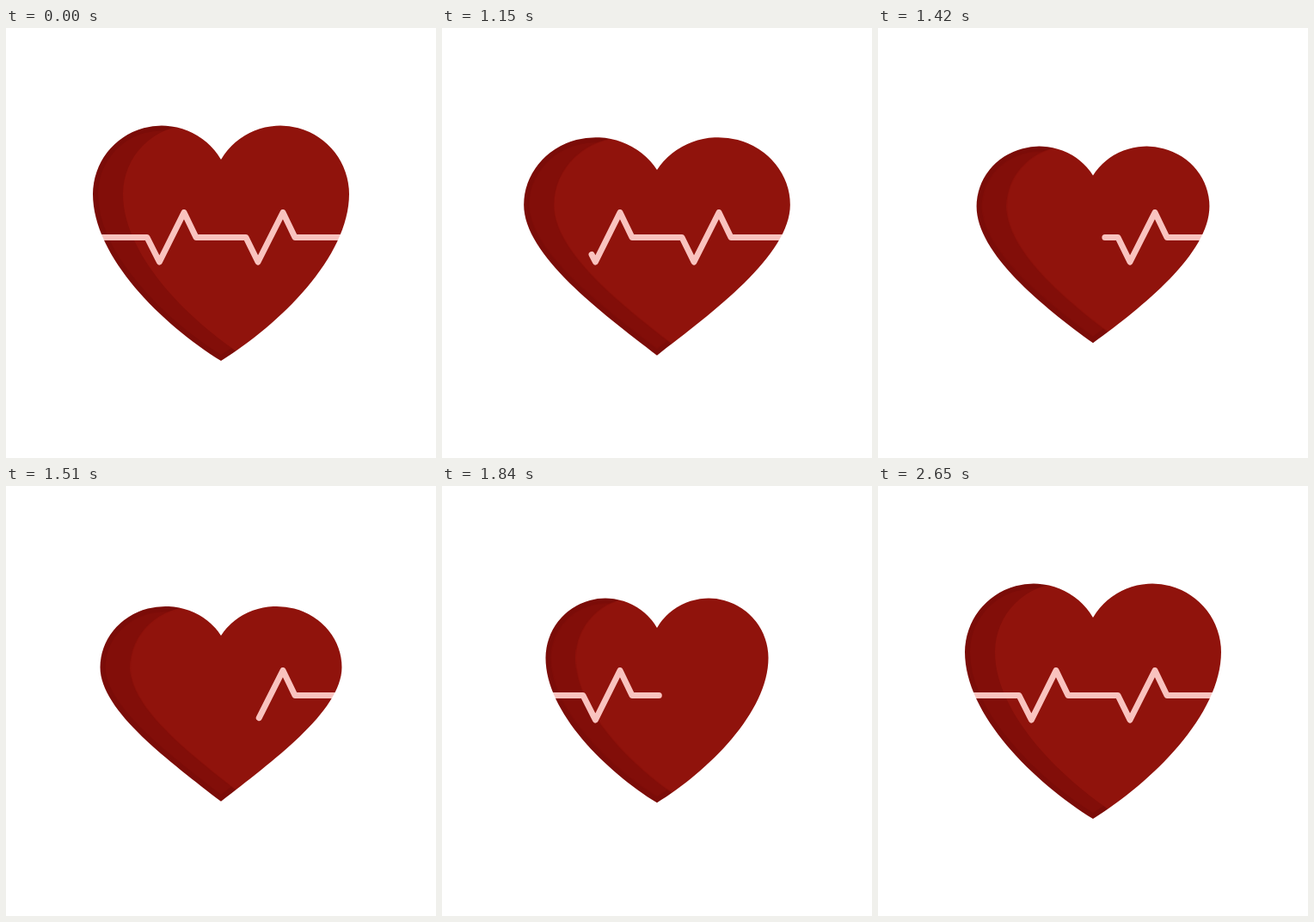
An HTML page without scripts for the animation above (2710 ms loop, 500 px wide and 500 px high).

```html
<!DOCTYPE html>
<html lang="en">
<head>
<meta charset="utf-8">
<title>Heartbeat</title>
<style>
  html, body { margin: 0; width: 100%; height: 100%; overflow: hidden; background: #fff; }
  svg { display: block; width: 100%; height: 100%; }

  .heart { animation: beat 2710ms linear infinite, heart 2710ms linear infinite; }
  .face { fill: #90130c; animation: beat 2710ms linear infinite, face 2710ms linear infinite; }
  .edge { fill: #820e09; stroke: #7b0c08; stroke-width: 12; vector-effect: non-scaling-stroke; }

  .pulse {
    fill: none; stroke: #f9c3bf; stroke-width: 7;
    stroke-linecap: round; stroke-linejoin: round;
    stroke-dasharray: 436 500;
  }
  .erase { animation: erase 2710ms linear infinite; }
  .draw { animation: draw 2710ms linear infinite; }

  /* Two beats, each landing smaller, then a soft return to full size */
  @keyframes beat {
    0%, 41.33% { transform: translate(250px, 244px) scale(1); }
    47.97% { transform: translate(250px, 244px) scale(.827); }
    55.35% { transform: translate(250px, 244px) scale(.888); }
    61.255% {
      transform: translate(250px, 244px) scale(.671);
      animation-timing-function: cubic-bezier(.333, .667, .667, 1);
    }
    79.336%, 100% { transform: translate(250px, 244px) scale(1); }
  }

  /* Round at rest, squashed at the height of each beat */
  @keyframes heart {
    0%, 36.9%, 47.97%, 61.255%, 100% {
      d: path("M0-91A80 80 0 0 0-149-51C-149 22-68 101 0 143C68 101 149 22 149-51A80 80 0 0 0 0-91Z");
    }
    41.33%, 55.35% {
      d: path("M0-79.5A87.3 81.2 0 0 0-161.8-37.2C-161.8 20.5-66.2 87.4 0 140.5C66.2 87.4 161.8 20.5 161.8-37.2A87.3 81.2 0 0 0 0-79.5Z");
    }
  }
  @keyframes face {
    0%, 36.9%, 47.97%, 61.255%, 100% {
      d: path("M-69-131A80 80 0 0 0-149-51C-149 22-68 101 0 143H300V-150H-69Z");
    }
    41.33%, 55.35% {
      d: path("M-74.5-118.4A87.3 81.2 0 0 0-161.8-37.2C-161.8 20.5-66.2 87.4 0 140.5H300V-150H-74.5Z");
    }
  }

  @keyframes erase {
    0%, 36.9% { stroke-dashoffset: 0; opacity: 1; }
    66.05% { stroke-dashoffset: -436; opacity: 1; }
    66.06%, 100% { stroke-dashoffset: -436; opacity: 0; }
  }
  @keyframes draw {
    0%, 56.6% { stroke-dashoffset: 436; opacity: 0; }
    56.61% { stroke-dashoffset: 436; opacity: 1; }
    78.97%, 100% { stroke-dashoffset: 0; opacity: 1; }
  }
</style>
</head>
<body>
<svg viewBox="0 0 500 500">
  <defs>
    <path id="trace" pathLength="436" d="M103 243.5H164L178.4 272L207 214.5L221 243.5H279L293 272L322 214.5L336 243.5H396"/>
    <clipPath id="inside"><path class="heart" d="M0 0"/></clipPath>
  </defs>
  <g clip-path="url(#inside)">
    <path class="heart edge" d="M0 0"/>
    <!-- The shade keeps its width while the heart scales -->
    <g transform="translate(35)"><path class="face" d="M0 0"/></g>
    <use href="#trace" class="pulse erase"/>
    <use href="#trace" class="pulse draw"/>
  </g>
</svg>
</body>
</html>
```
